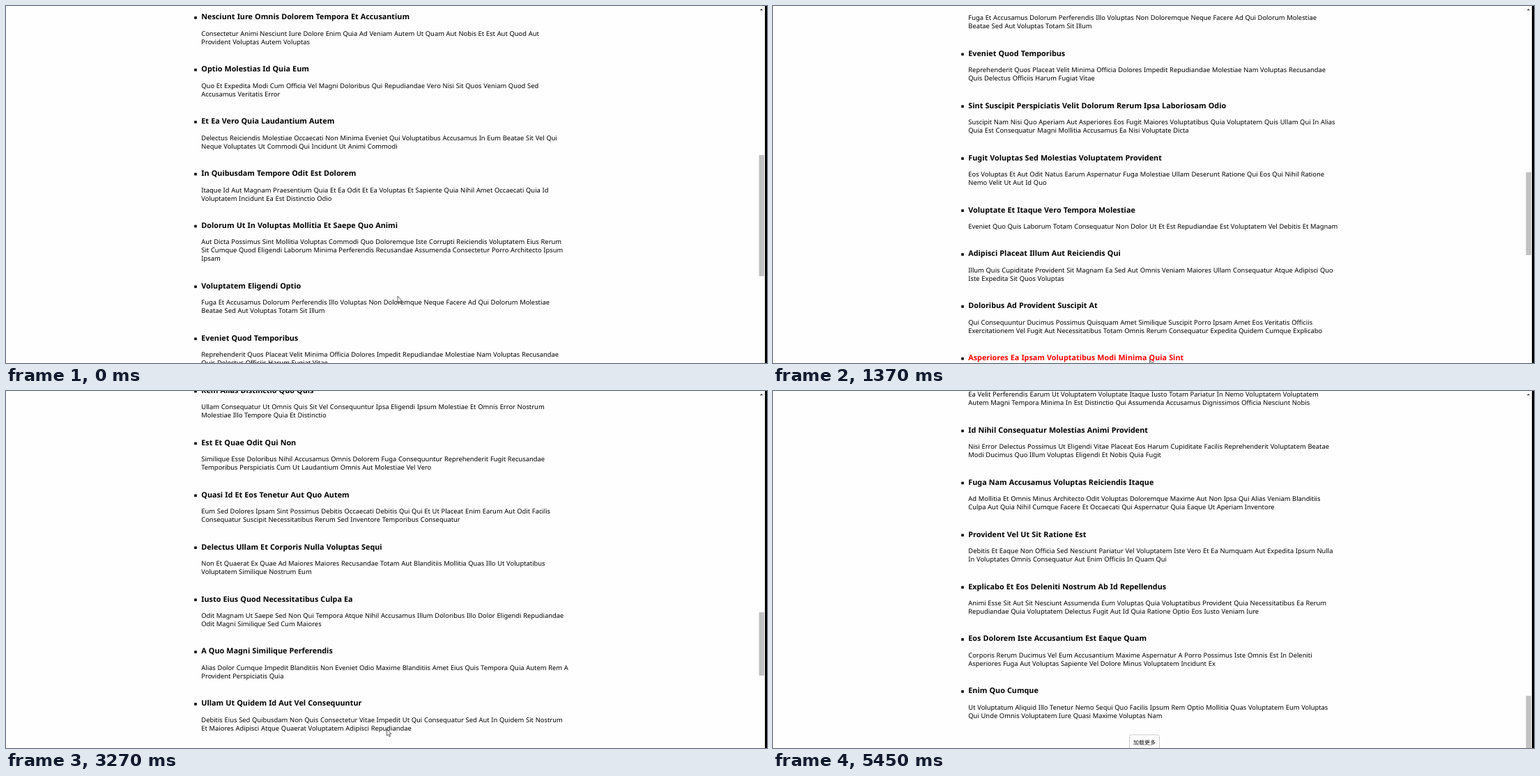
Recreate the animation shown at these times as an HTML page. Size 1092 px wide and 513 px high, loop 6.53 s.

```html
<!DOCTYPE html>
<html lang="en">
<head>
<meta charset="utf-8">
<title>Load more list</title>
<style>
html, body { margin: 0; width: 100%; height: 100%; overflow: hidden; background: #fefefe; }
svg { display: block; width: 1092px; height: 513px; }
text { font-family: "Noto Sans", "Open Sans", sans-serif; text-rendering: geometricPrecision; white-space: pre; }
.title { font-size: 10.8px; font-weight: 700; word-spacing: .3px; fill: #000; }
.line { font-size: 9.37px; word-spacing: .27px; fill: #000; }
.hover { fill: #f00; }
.more { font: 8px "Noto Sans CJK SC", "Noto Sans CJK", "Noto Sans CJK JP", sans-serif; fill: #111; text-anchor: middle; }
</style>
</head>
<body>
<svg id="stage" viewBox="0 0 1092 513"></svg>
<script>
// One item per row: title|line|line...
const ITEMS = `Nesciunt Iure Omnis Dolorem Tempora Et Accusantium|Consectetur Animi Nesciunt Iure Dolore Enim Quia Ad Veniam Autem Ut Quam Aut Nobis Et Est Aut Quod Aut|Provident Voluptas Autem Voluptas
Optio Molestias Id Quia Eum|Quo Et Expedita Modi Cum Officia Vel Magni Doloribus Qui Repudiandae Vero Nisi Sit Quos Veniam Quod Sed|Accusamus Veritatis Error
Et Ea Vero Quia Laudantium Autem|Delectus Reiciendis Molestiae Occaecati Non Minima Eveniet Qui Voluptatibus Accusamus In Eum Beatae Sit Vel Qui|Neque Voluptates Ut Commodi Qui Incidunt Ut Animi Commodi
In Quibusdam Tempore Odit Est Dolorem|Itaque Id Aut Magnam Praesentium Quia Et Ea Odit Et Ea Voluptas Et Sapiente Quia Nihil Amet Occaecati Quia Id|Voluptatem Incidunt Ea Est Distinctio Odio
Dolorum Ut In Voluptas Mollitia Et Saepe Quo Animi|Aut Dicta Possimus Sint Mollitia Voluptas Commodi Quo Doloremque Iste Corrupti Reiciendis Voluptatem Eius Rerum|Sit Cumque Quod Eligendi Laborum Minima Perferendis Recusandae Assumenda Consectetur Porro Architecto Ipsum|Ipsam
Voluptatem Eligendi Optio|Fuga Et Accusamus Dolorum Perferendis Illo Voluptas Non Doloremque Neque Facere Ad Qui Dolorum Molestiae|Beatae Sed Aut Voluptas Totam Sit Illum
Eveniet Quod Temporibus|Reprehenderit Quos Placeat Velit Minima Officia Dolores Impedit Repudiandae Molestiae Nam Voluptas Recusandae|Quis Delectus Officiis Harum Fugiat Vitae
Sint Suscipit Perspiciatis Velit Dolorum Rerum Ipsa Laboriosam Odio|Suscipit Nam Nisi Quo Aperiam Aut Asperiores Eos Fugit Maiores Voluptatibus Quia Voluptatem Quis Ullam Qui In Alias|Quia Est Consequatur Magni Mollitia Accusamus Ea Nisi Voluptate Dicta
Fugit Voluptas Sed Molestias Voluptatem Provident|Eos Voluptas Et Aut Odit Natus Earum Aspernatur Fuga Molestiae Ullam Deserunt Ratione Qui Eos Qui Nihil Ratione|Nemo Velit Ut Aut Id Quo
Voluptate Et Itaque Vero Tempora Molestiae|Eveniet Quo Quis Laborum Totam Consequatur Non Dolor Ut Et Est Repudiandae Est Voluptatem Vel Debitis Et Magnam
Adipisci Placeat Illum Aut Reiciendis Qui|Illum Quis Cupiditate Provident Sit Magnam Ea Sed Aut Omnis Veniam Maiores Ullam Consequatur Atque Adipisci Quo|Iste Expedita Sit Quos Voluptas
Doloribus Ad Provident Suscipit At|Qui Consequuntur Ducimus Possimus Quisquam Amet Similique Suscipit Porro Ipsam Amet Eos Veritatis Officiis|Exercitationem Vel Fugit Aut Necessitatibus Totam Omnis Rerum Consequatur Expedita Quidem Cumque Explicabo
Asperiores Ea Ipsam Voluptatibus Modi Minima Quia Sint|Quia Dolorem Aut Nihil Placeat Est Ut Omnis Voluptas Rerum Sed Facilis Quis Enim Et Molestiae Vel Nostrum Qui|Tempora Et Illum Quo Deleniti Autem
Minus Et Quo Voluptatem Harum|Vero Ut Dolores Sit Eaque Non Ipsum Consequatur Ad Quia Maxime Et Sapiente Qui Laborum Aut Nemo Occaecati|Rerum Quod Sit Voluptates Et Animi
Omnis Sed Dolore Facere Quia|Natus Eos Quidem Aut Veritatis Nam Est Corporis Et Tenetur Illo Voluptas Qui Aperiam Sunt Modi Dolorum Aut|Neque Iste Ut Fugiat Commodi Velit
Laborum Qui Aut Nemo Veniam|Enim Et Ex Nulla Omnis Voluptas Quia Qui Voluptatem Consequatur Numquam Aliquam Sunt Totam Recusandae Id|Dignissimos Aut Sed Asperiores Deserunt
Rem Alias Distinctio Quo Quis|Ullam Consequatur Ut Omnis Quis Sit Vel Consequuntur Ipsa Eligendi Ipsum Molestiae Et Omnis Error Nostrum|Molestiae Illo Tempore Quia Et Distinctio
Est Et Quae Odit Qui Non|Similique Esse Doloribus Nihil Accusamus Omnis Dolorem Fuga Consequuntur Reprehenderit Fugit Recusandae|Temporibus Perspiciatis Cum Ut Laudantium Omnis Aut Molestiae Vel Vero
Quasi Id Et Eos Tenetur Aut Quo Autem|Eum Sed Dolores Ipsam Sint Possimus Debitis Occaecati Debitis Qui Qui Et Ut Placeat Enim Earum Aut Odit Facilis|Consequatur Suscipit Necessitatibus Rerum Sed Inventore Temporibus Consequatur
Delectus Ullam Et Corporis Nulla Voluptas Sequi|Non Et Quaerat Ex Quae Ad Maiores Maiores Recusandae Totam Aut Blanditiis Mollitia Quas Illo Ut Voluptatibus|Voluptatem Similique Nostrum Eum
Iusto Eius Quod Necessitatibus Culpa Ea|Odit Magnam Ut Saepe Sed Non Qui Tempora Atque Nihil Accusamus Illum Doloribus Illo Dolor Eligendi Repudiandae|Odit Magni Similique Sed Cum Maiores
A Quo Magni Similique Perferendis|Alias Dolor Cumque Impedit Blanditiis Non Eveniet Odio Maxime Blanditiis Amet Eius Quis Tempora Quia Autem Rem A|Provident Perspiciatis Quia
Ullam Ut Quidem Id Aut Vel Consequuntur|Debitis Eius Sed Quibusdam Non Quis Consectetur Vitae Impedit Ut Qui Consequatur Sed Aut In Quidem Sit Nostrum|Et Maiores Adipisci Atque Quaerat Voluptatem Adipisci Repudiandae
Sapiente Quo Rerum Et Dolores|Aut Nihil Omnis Voluptatem Sit Ratione Quia Et Mollitia Eum Placeat Qui Nesciunt Vel Ipsa Tenetur Ut Dolorem|Facilis Est Quae Sed Voluptas Nisi
Culpa Et Molestiae Aut Vitae|Sequi Ut Eligendi Non Deserunt Quas Et Officia Rerum Illum Qui Possimus Ad Maiores Est Nulla Quo Commodi|Autem Error Sit Magni Et Libero
Voluptas Nemo Ut Eaque Quis|Ea Velit Perferendis Earum Ut Voluptatem Voluptate Itaque Iusto Totam Pariatur In Nemo Voluptatem Voluptatem|Autem Magni Tempora Minima In Est Distinctio Qui Assumenda Accusamus Dignissimos Officia Nesciunt Nobis
Id Nihil Consequatur Molestias Animi Provident|Nisi Error Delectus Possimus Ut Eligendi Vitae Placeat Eos Harum Cupiditate Facilis Reprehenderit Voluptatem Beatae|Modi Ducimus Quo Illum Voluptas Eligendi Et Nobis Quia Fugit
Fuga Nam Accusamus Voluptas Reiciendis Itaque|Ad Mollitia Et Omnis Minus Architecto Odit Voluptas Doloremque Maxime Aut Non Ipsa Qui Alias Veniam Blanditiis|Culpa Aut Quia Nihil Cumque Facere Et Occaecati Qui Aspernatur Quia Eaque Ut Aperiam Inventore
Provident Vel Ut Sit Ratione Est|Debitis Et Eaque Non Officia Sed Nesciunt Pariatur Vel Voluptatem Iste Vero Et Ea Numquam Aut Expedita Ipsum Nulla|In Voluptates Omnis Consequatur Aut Enim Officiis In Quam Qui
Explicabo Et Eos Deleniti Nostrum Ab Id Repellendus|Animi Esse Sit Aut Sit Nesciunt Assumenda Eum Voluptas Quia Voluptatibus Provident Quia Necessitatibus Ea Rerum|Repudiandae Quia Voluptatem Delectus Fugit Aut Id Quia Ratione Optio Eos Iusto Veniam Iure
Eos Dolorem Iste Accusantium Est Eaque Quam|Corporis Rerum Ducimus Vel Eum Accusantium Maxime Aspernatur A Porro Possimus Iste Omnis Est In Deleniti|Asperiores Fuga Aut Voluptas Sapiente Vel Dolore Minus Voluptatem Incidunt Ex
Enim Quo Cumque|Ut Voluptatum Aliquid Illo Tenetur Nemo Sequi Quo Facilis Ipsum Rem Optio Mollitia Quas Voluptatem Eum Voluptas|Qui Unde Omnis Voluptatem Iure Quasi Maxime Voluptas Nam`
  .split("\n").map(row => row.split("|"));

const LOOP = 6530, PITCH = 74.9, LINE = 12;

// The screen is refreshed only at these moments.
const TICKS = [0, 140, 270, 410, 540, 670, 820, 1000, 1120, 1250, 1370, 1500, 1620,
  1760, 1880, 2000, 2120, 2240, 2360, 2500, 2630, 2750, 2870, 3000, 3120,
  3270, 3390, 3530, 3680, 3800, 3920, 4060, 5200, 5330, 5450];

// [time, scroll offset]
const SCROLL = [[0, 0], [670, 392.4], [820, 408.9], [1620, 408.9], [2360, 1156.1],
  [2500, 1157.9], [3120, 1157.9], [3270, 1214.8], [3390, 1335], [3530, 1490], [3920, 1906.9]];

// [time, x, y]
const POINTER = [[0, 562, 417], [670, 557, 441], [820, 552, 470], [1000, 542, 507],
  [1620, 541, 508], [1760, 545, 490], [2360, 551.5, 469], [2750, 545, 503], [3120, 545, 503],
  [3270, 546.5, 486], [3390, 550, 490], [3920, 619, 510], [5200, 980, 508], [5330, 979, 505]];

// State of the list after each load: items shown and scrollbar thumb.
const STAGES = [
  { from: 0, count: 12, height: 174, top: 345, at: 392.4, rate: 1 / 3 },
  { from: 1250, count: 22, height: 119, top: 239, at: 408.9, rate: .2262, calm: 1760 },
  { from: 2870, count: 32, height: 91, top: 318, at: 1214.8, rate: .1734, calm: 3270 }
];

const stage = document.getElementById("stage");

function add(parent, tag, attrs, label) {
  const el = document.createElementNS("http://www.w3.org/2000/svg", tag);
  for (const key in attrs) el.setAttribute(key, attrs[key]);
  if (label) el.textContent = label;
  return parent.appendChild(el);
}

const move = (el, x, y) => el.setAttribute("transform", `translate(${x} ${y})`);
const show = (el, on) => el.setAttribute("display", on ? "inline" : "none");
const last = (list, test) => list.filter(test).pop();

function track(keys, t) {
  const i = keys.findIndex(k => k[0] > t);
  if (i < 0) return keys[keys.length - 1].slice(1);
  const a = keys[i - 1], b = keys[i], p = (t - a[0]) / (b[0] - a[0]);
  return a.slice(1).map((v, n) => v + (b[n + 1] - v) * p);
}

add(stage, "rect", { width: 1092, height: 513, fill: "#fefefe" });
const list = add(stage, "g", {});
let nextY = 15.5;
const rows = ITEMS.map(([title, ...lines]) => {
  const y = nextY, g = add(list, "g", { transform: `translate(0 ${y})` });
  add(g, "rect", { x: 270.2, y: -.4, width: 3.6, height: 3.6 });
  const head = add(g, "text", { class: "title", x: 280.3, y: 3.8 }, title);
  lines.forEach((s, i) => add(g, "text", { class: "line", x: 280.3, y: 27.4 + i * LINE }, s));
  nextY += PITCH + (lines.length - 2) * LINE;
  return { g, head, y };
});

const more = add(list, "g", {});
add(more, "rect", { x: 511.5, y: .5, width: 43, height: 23, rx: 3, fill: "#fff", stroke: "#ccc" });
add(more, "text", { class: "more", x: 533, y: 14.5 }, "加载更多");

const thumb = add(stage, "rect", { x: 1080.5, width: 7.5, fill: "#c1c1c1" });
add(stage, "path", { d: "M1081.8 6.2L1084 3.8L1086.2 6.2Z", fill: "#444" });
add(stage, "rect", { x: 1089, width: 3, height: 513, fill: "#000" });

const ink = { fill: "#fff", stroke: "#222", "stroke-width": .7, "stroke-linejoin": "round" };
const arrow = add(stage, "path", { ...ink, d: "M0 0V9.3L2.1 7.4L3.6 10.7L5 10.1L3.6 6.9H6.4Z" });
const hand = add(stage, "path", { ...ink,
  d: "M-1.2 7.5V.9Q-1.2 0 -.4 0T.5 .9V4.2Q1.4 3.5 2.2 4.5Q3.2 3.8 3.8 4.9Q5 4.4 5 5.8V8.6Q5 10.5 4 11.8H-.6Q-1.6 10.2 -3.6 7.6Q-4 6.6 -3 6.4Q-2.1 6.4 -1.2 7.5Z" });

function render(time) {
  const t = last(TICKS, v => v <= time);
  const state = last(STAGES, s => s.from <= t);
  const [scroll] = track(SCROLL, t), [x, y] = track(POINTER, t);

  move(list, 0, -scroll);
  rows.forEach((row, i) => show(row.g, i < state.count));
  move(more, 0, rows[state.count - 1].y + 63);
  STAGES.slice(1).forEach(s =>
    rows[s.count - 10].head.classList.toggle("hover", t >= s.from && t < s.calm));

  thumb.setAttribute("y", state.top + (scroll - state.at) * state.rate);
  thumb.setAttribute("height", state.height);

  const visible = t < 4060 || (t >= 5200 && t < 5450);
  const pointing = (t >= 670 && t < 1760) || (t >= 2630 && t < 3270);
  show(arrow, visible && !pointing);
  show(hand, visible && pointing);
  move(arrow, x, y);
  move(hand, x, y);
}

const start = performance.now();
function frame() {
  render((performance.now() - start) % LOOP);
  requestAnimationFrame(frame);
}
frame();
</script>
</body>
</html>
```
